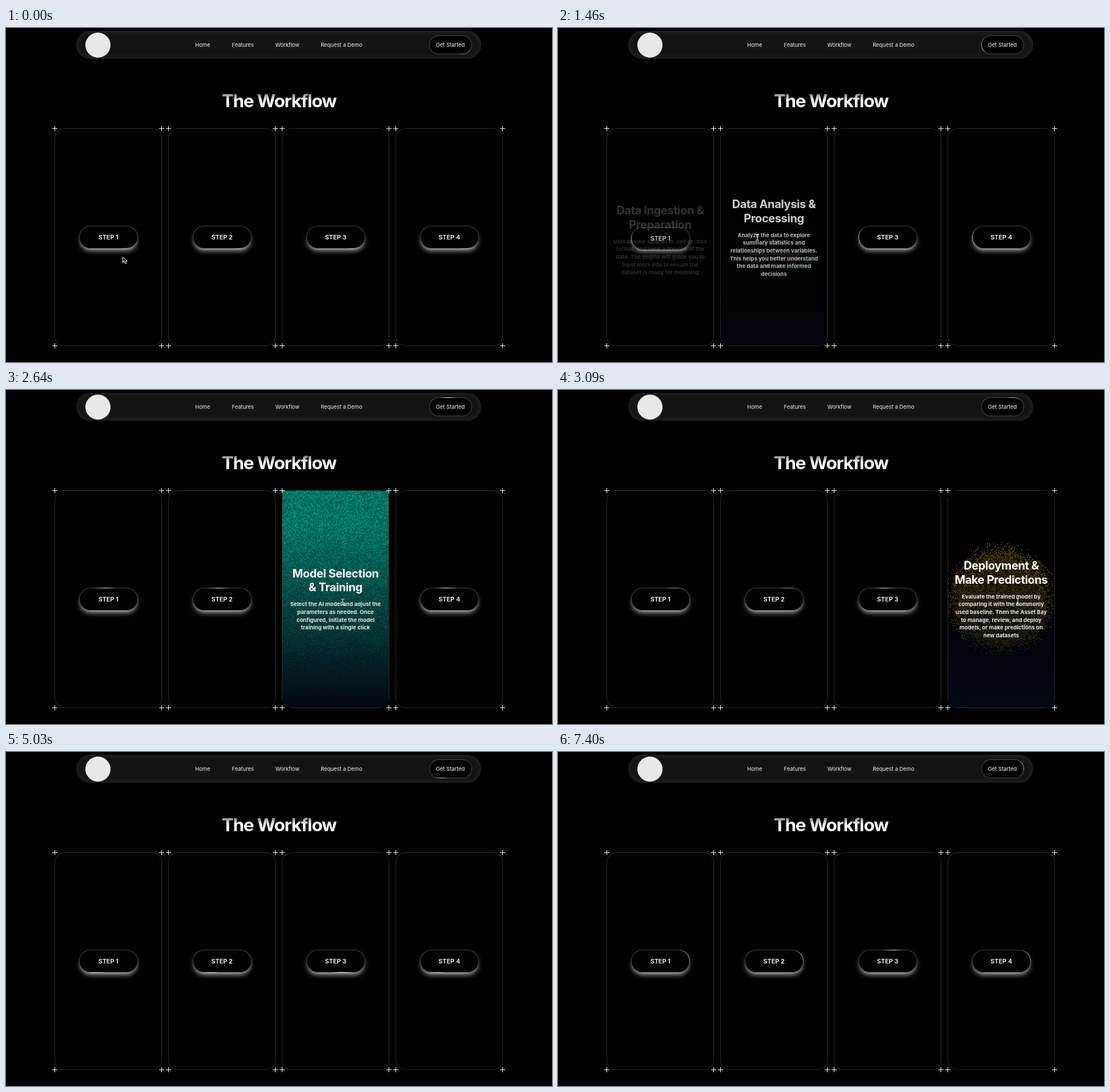
Animation of 956 by 586 pixels, one loop 7420 ms. Source, as an HTML page with a canvas:

```html
<!DOCTYPE html>
<html lang="en">
<head>
<meta charset="utf-8">
<title>The Workflow</title>
<style>
  html, body { margin: 0; width: 100%; height: 100%; overflow: hidden; background: #000; }
  body { position: relative; color: #fff; font-family: Inter, sans-serif; font-optical-sizing: none; }
  #stage { position: absolute; left: 0; top: 0; width: 956px; height: 586px; overflow: hidden; }
  #stage div, canvas, svg { position: absolute; box-sizing: border-box; }
  .label { transform: translate(-50%, -50%); white-space: nowrap; line-height: 1; }
  #bar { left: 123px; top: 5px; width: 709px; height: 49px; border-radius: 25px;
    background: #141414; box-shadow: inset 0 0 6px 4px #202020; }
  #badge { left: 139px; top: 8px; width: 44px; height: 44px; border-radius: 50%; background: #e8e8e8; }
  .nav { top: 29.5px; font-size: 9.4px; color: #f2f2f2; }
  #title { left: 478px; top: 128px; font-size: 31.5px; font-weight: 700; letter-spacing: -1.25px;
    line-height: 40px; color: transparent; -webkit-background-clip: text; background-clip: text;
    background-image: linear-gradient(#8e8b90 20%, #d6d5d7 38%, #fff 46%); }
  .card { top: 176px; width: 188px; height: 382px; }
  .frame { inset: 0; border: 1px solid #2d2d2d; border-radius: 17px; }
  .card canvas { left: 1px; top: 1px; width: 186px; height: 380px; }
  .plus { width: 9px; height: 9px; margin: -4.5px;
    background: linear-gradient(#fff, #fff) 50% / 100% 1px no-repeat,
                linear-gradient(#fff, #fff) 50% / 1px 100% no-repeat; }
  .pill { border: 1.4px solid transparent; display: flex; align-items: center; justify-content: center; }
  .step { left: 42.5px; top: 171px; width: 103.5px; height: 40px; border-radius: 20px;
    font-size: 10.9px; font-weight: 600;
    box-shadow: 0 2px 2px -1px rgba(255, 255, 255, .4), 0 6px 8px -2px rgba(255, 255, 255, .6); }
  #start { left: 740.5px; top: 13px; width: 75px; height: 32.5px; border-radius: 17px; font-size: 9.4px; }
  .info { inset: 0; display: flex; flex-direction: column; justify-content: center;
    text-align: center; white-space: nowrap; }
  h2 { margin: 0 -10px 10.4px; font-size: 20px; font-weight: 700; line-height: 24.5px; letter-spacing: -.4px; }
  p { margin: 0 -10px; font-size: 9.55px; font-weight: 700; line-height: 13.65px; color: #e5e7eb; }
  #cursor { left: 0; top: 0; overflow: visible; }
</style>
</head>
<body>
<div id="stage">
  <div id="bar"></div>
  <div id="badge"></div>
  <div class="label nav" style="left:344.4px">Home</div>
  <div class="label nav" style="left:414.8px">Features</div>
  <div class="label nav" style="left:492.7px">Workflow</div>
  <div class="label nav" style="left:587.5px">Request a Demo</div>
  <div id="start" class="pill">Get Started</div>
  <div id="title" class="label">The Workflow</div>
</div>
<script>
const LOOP = 7420;
const stage = document.getElementById('stage');

// step number and its start in ms; steps are even between the entries
const BEATS = [[0, 0], [1, 150], [10, 1460], [15, 2200], [21, 3090], [29, 4290], [34, 5030], [50, 7400], [51, 7420]];

// time, x, y of the pointer's middle
const PATH = [
  [0, 208, 408], [600, 192, 386], [1250, 205, 372], [1355, 284, 369], [1460, 349, 367],
  [1700, 385, 368], [1950, 405, 370], [2095, 484, 372], [2200, 569, 372], [2450, 585, 372],
  [2700, 610, 372], [2810, 683, 371], [3090, 805, 371], [3500, 800, 373], [4100, 808, 372],
  [4240, 860, 375], [4290, 901, 377], [4730, 922, 392], [4880, 936, 575], [5030, 945, 620], [LOOP, 945, 620]
];

const CARDS = [
  { on: 30, off: 1355, bg: '#000', dots: ['125,211,252'], speed: 3,
    head: 'Data Ingestion &<br>Preparation',
    body: 'Upload your dataset in .csv or .xlsx<br>format, and view a preview of the<br>data. The engine will guide you to<br>input more info to ensure the<br>dataset is ready for modeling' },
  { on: 1355, off: 2095, bg: '#000', dots: ['236,72,153', '232,121,249'], speed: 3,
    head: 'Data Analysis &<br>Processing',
    body: 'Analyze the data to explore<br>summary statistics and<br>relationships between variables.<br>This helps you better understand<br>the data and make informed<br>decisions' },
  { on: 2095, off: 2810, bg: '#064e3b', dots: ['0,255,255'], speed: 5.1,
    head: 'Model Selection<br>&amp; Training',
    body: 'Select the AI model and adjust the<br>parameters as needed. Once<br>configured, initiate the model<br>training with a single click' },
  { on: 2810, off: 4295, bg: '#000', dots: ['245,192,20'], speed: 3,
    head: 'Deployment &<br>Make Predictions',
    body: 'Evaluate the trained model by<br>comparing it with the commonly<br>used baseline. Then the Asset Bay<br>to manage, review, and deploy<br>models, or make predictions on<br>new datasets' }
];

// radial highlight on the top, right, bottom and left edge: width, height, x, y in %
const GLOW = [[20.7, 50, 50, 0], [16.2, 41.2, 100, 50], [20.7, 50, 50, 100], [16.6, 43.1, 0, 50]];
const LEVELS = [.3, .3, .3, .5, .5, .5, .8, .8, .8, 1];
const PITCH = 2, DOT = 1.2, W = 186, H = 380;

const clamp = x => Math.max(0, Math.min(1, x));
const mix = (a, b, q) => a + (b - a) * q;
const ease = x => 1 - (1 - clamp(x) ** 1.6) ** 3.7;
const noise = (x, y) => {
  const v = Math.sin(x * 12.9898 + y * 78.233) * 43758.5453;
  return v - Math.floor(v);
};

function add(parent, cls, html = '') {
  const el = document.createElement('div');
  el.className = cls;
  el.innerHTML = html;
  parent.append(el);
  return el;
}

function sample(rows, t) {
  let i = 1;
  while (i < rows.length - 1 && t >= rows[i][0]) i++;
  const a = rows[i - 1], b = rows[i], q = clamp((t - a[0]) / (b[0] - a[0]));
  return a.map((v, k) => mix(v, b[k], q));
}

function snap(t) {
  let i = 1;
  while (i < BEATS.length - 1 && t >= BEATS[i][1]) i++;
  const [n, a] = BEATS[i - 1], [m, b] = BEATS[i];
  const gap = (b - a) / (m - n);
  return a + Math.floor((t - a) / gap) * gap;
}

CARDS.forEach((c, i) => {
  const card = add(stage, 'card');
  card.style.left = 85 + i * 199 + 'px';
  add(card, 'frame');
  for (const x of [.5, 187.5]) for (const y of [.5, 381.5]) {
    const s = add(card, 'plus').style;
    s.left = x + 'px';
    s.top = y + 'px';
  }
  const canvas = document.createElement('canvas');
  const ratio = window.devicePixelRatio || 1;
  canvas.width = W * ratio;
  canvas.height = H * ratio;
  card.append(canvas);
  c.canvas = canvas;
  c.ctx = canvas.getContext('2d');
  c.ctx.scale(ratio, ratio);
  c.step = add(card, 'pill step', 'STEP ' + (i + 1));
  c.info = add(card, 'info', `<h2>${c.head}</h2><p>${c.body}</p>`);
});

stage.insertAdjacentHTML('beforeend', `<svg id="cursor" width="1" height="1">
  <path id="arrow" d="M-3.5-6V4.2L-1-.1L-1 1.8L1 5.8L2.8 5L1 1.2H4.2Z" fill="#000" stroke="#fff" stroke-width="1" stroke-linejoin="round"/>
  <path id="beam" d="M-3-5.5Q0-5.5 0-3.5V3.5Q0 5.5-3 5.5M3-5.5Q0-5.5 0-3.5M0 3.5Q0 5.5 3 5.5M-1.6 1.2H1.6" fill="none" stroke="#ddd" stroke-width="1.1"/>
</svg>`);
const [startPill, cursor, arrow, beam] = ['start', 'cursor', 'arrow', 'beam'].map(id => document.getElementById(id));

function light(el, turn, base) {
  const u = (turn % 4 + 4) % 4, i = Math.floor(u);
  const [w, h, x, y] = GLOW[i].map((v, k) => mix(v, GLOW[(i + 1) % 4][k], u - i));
  el.style.background = `linear-gradient(#000, #000) padding-box,
    radial-gradient(${w}% ${h}% at ${x}% ${y}%, #fff, rgba(255,255,255,0)) border-box,
    linear-gradient(${base}, ${base}) border-box`;
}

// dots spread from the middle with a ragged edge
function reveal(c, t) {
  const { ctx } = c;
  ctx.globalAlpha = 1;
  ctx.fillStyle = c.bg;
  ctx.fillRect(0, 0, W, H);
  const reach = (t - 110) / 1000 * c.speed;
  const cols = W / PITCH, rows = H / PITCH;
  if (reach > 0) for (let y = 0; y < rows; y++) for (let x = 0; x < cols; x++) {
    const from = Math.hypot(x - cols / 2, y - rows / 2) * .01 + noise(x, y) * .15;
    if (from > reach) continue;
    const edge = reach < from + .1 ? 1.25 : 1;
    const tone = c.dots[Math.floor(noise(y + 3, x) * c.dots.length)];
    ctx.globalAlpha = Math.min(1, LEVELS[Math.floor(noise(x + 7, y + 5) * 10)] * edge);
    ctx.fillStyle = `rgb(${tone})`;
    ctx.fillRect(x * PITCH, y * PITCH, DOT, DOT);
  }
  ctx.globalAlpha = 1;
  const shade = ctx.createLinearGradient(0, H, 0, H * .16);
  shade.addColorStop(0, 'rgba(3,7,18,1)');
  shade.addColorStop(1, 'rgba(3,7,18,0)');
  ctx.fillStyle = shade;
  ctx.fillRect(0, 0, W, H);
}

function draw(t) {
  const turn = t / 1000 + 1.39;
  light(startPill, turn, '#4a4a4a');
  CARDS.forEach((c, i) => {
    const p = t < c.off ? ease((t - c.on) / 200) : 1 - ease((t - c.off) / 200);
    const open = t >= c.on && t < c.off;
    c.step.style.opacity = 1 - p;
    c.step.style.transform = `translateY(${10 * p}px)`;
    c.info.style.opacity = p;
    c.info.style.transform = `translateY(${.4 + 5.2 * (1 - p)}px)`;
    // the third highlight rests while its card is open
    const lag = i === 2 ? .6 * clamp((t - c.on) / 600) : 0;
    light(c.step, turn - lag, '#444');
    c.canvas.style.opacity = open ? 1 - (1 - clamp((t - c.on) / 300)) ** 1.7 : 0;
    if (open) reveal(c, t - c.on);
  });
  const [, x, y] = sample(PATH, t);
  const overText = t >= 150 && t < 4240;
  cursor.style.transform = `translate(${x}px, ${y}px)`;
  arrow.style.display = overText ? 'none' : '';
  beam.style.display = overText ? '' : 'none';
}

let shown = -1;
const began = performance.now();
function tick() {
  const t = snap((performance.now() - began) % LOOP);
  if (t !== shown) draw(shown = t);
  requestAnimationFrame(tick);
}
tick();
</script>
</body>
</html>
```
